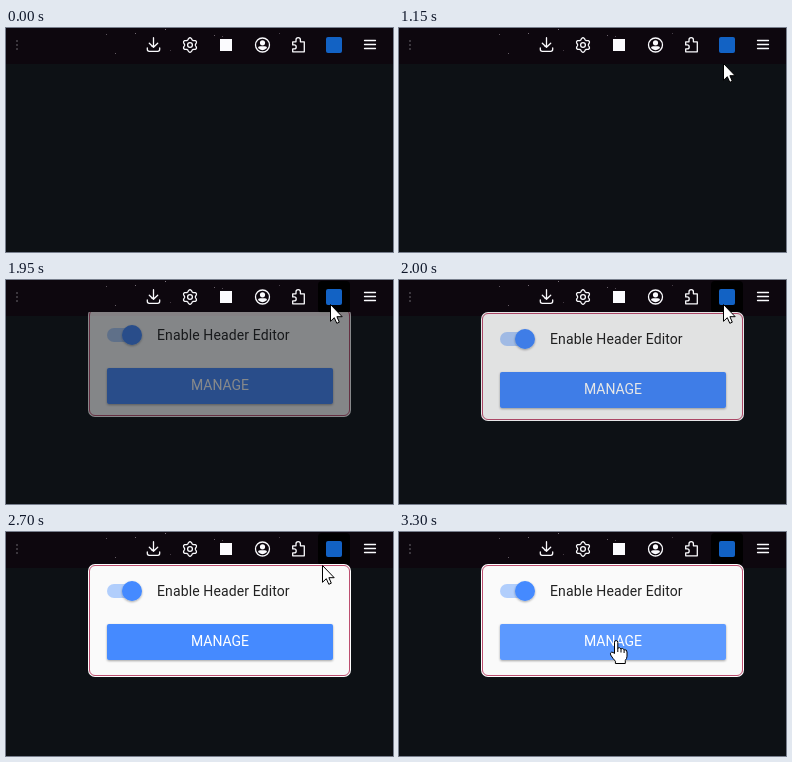
Animation of 387 by 224 pixels, one loop 4.35 s. Source, as an HTML page:

```html
<!DOCTYPE html>
<html lang="en">
<head>
<meta charset="utf-8">
<title>Toolbar popup</title>
<style>
  html, body { margin: 0; width: 100%; height: 100%; overflow: hidden; background: #0d1115; }
  svg { display: block; width: 387px; height: 224px; }
  text { font: 14px Roboto, sans-serif; }
  .line { fill: none; stroke: #fbfbfe; stroke-width: 1.3; stroke-linecap: round; stroke-linejoin: round; }
  .solid { fill: #fbfbfe; }
  .pointer { fill: #fff; stroke: #000; stroke-linejoin: round; }
</style>
</head>
<body>
<svg viewBox="0 0 387 224">
  <defs>
    <clipPath id="below"><rect y="32" width="387" height="192"/></clipPath>
    <filter id="shade" x="-20%" y="-20%" width="140%" height="160%">
      <feDropShadow dx="0" dy="1" stdDeviation="1" flood-opacity=".35"/>
    </filter>
  </defs>

  <rect width="387" height="224" fill="#0d1115"/>
  <rect width="387" height="36" fill="#0d070e"/>
  <g id="stars" fill="#b9aeb9"></g>
  <path d="M11 12V22" stroke="#48434a" stroke-width="1.6" stroke-dasharray="2"/>
  <rect id="pressed" x="312" y="1" width="32" height="32" rx="4"/>

  <g class="line">
    <path d="M147.5 9.7V19M143.3 15.2L147.5 19.3L151.7 15.2M141.3 20V21.3Q141.3 23.3 143.3 23.3H151.7Q153.7 23.3 153.7 21.3V20"/>
    <path id="gear"/>
    <circle cx="184" cy="17" r="2.4"/>
    <circle cx="256.5" cy="17" r="7"/>
    <path d="M286.7 13.8H290V11.8A2.2 2.2 0 0 1 294.4 11.8V13.8H298.3V23.8H286.7V20.9H288.2A2 2 0 0 0 288.2 16.9H286.7Z"/>
    <path d="M358.5 12.5H369.5M358.5 16.5H369.5M358.5 20.5H369.5"/>
  </g>
  <g class="solid">
    <rect x="214" y="11" width="12" height="12"/>
    <circle cx="256.5" cy="14.8" r="2.6"/>
    <path d="M252 20.1Q252 18.3 254 18.3H259Q261 18.3 261 20.1Q259 22.2 256.5 22.2T252 20.1Z"/>
  </g>
  <rect x="320" y="9" width="16" height="16" rx="2" fill="#1262c4"/>

  <g clip-path="url(#below)">
    <g id="popup">
      <rect class="panel" x="82" y="32" width="263" height="113" rx="7" fill="#fff"/>
      <rect class="panel" x="83.5" y="33.5" width="260" height="110" rx="5.5" fill="#fafafa" stroke="#bd4f70"/>
      <rect x="101" y="52" width="31" height="14" rx="7" fill="#b1cefc"/>
      <circle cx="126" cy="59" r="10" fill="#448aff" filter="url(#shade)"/>
      <text x="151" y="64" fill="#212121" letter-spacing=".12">Enable Header Editor</text>
      <rect id="button" x="101" y="92" width="226" height="36" rx="2" filter="url(#shade)"/>
      <text x="214" y="114" fill="#fff" text-anchor="middle">MANAGE</text>
    </g>
  </g>

  <g id="cursor" class="pointer">
    <path id="arrow" d="M.5 .5V17.3L4.3 13.7L6.8 19.3L9.3 18.2L6.9 12.7H12.2Z"/>
    <g id="hand">
      <path d="M-1.5 13.5V2.2A1.6 1.6 0 0 1 1.8 2.2V8.2Q3.4 6.8 5 8.8Q6.8 7.8 8.1 9.7Q11 9.2 11 12V16.2Q11 18.5 9.3 20.4V23.5H-.6V21.2Q-3 18.8 -5.3 15Q-6.3 12.7 -4.4 12.2Q-3 12 -1.5 13.5Z"/>
      <path fill="none" d="M1.8 8V12M5 9V12.5M8.1 10V13"/>
    </g>
  </g>
</svg>
<script>
const $ = id => document.getElementById(id);
const LOOP = 4350, STEP = 50;

const linear = k => k;
const power = p => k => k ** p;
const easeOut = p => k => 1 - (1 - k) ** p;
const smooth = k => k ** 3 * (k * (6 * k - 15) + 10);

// Eased 0..1 progress of t between two times
const progress = (t, start, end, ease = linear) =>
  ease(Math.min(1, Math.max(0, (t - start) / (end - start))));
const mix = (a, b, k) => a + (b - a) * k;

function cursorAt(t) {
  if (t < 2650) return [
    mix(377, 324, progress(t, 450, 1150, easeOut(1.3))),
    mix(207, 28, progress(t, 450, 1300, easeOut(1.85))) - 4 * progress(t, 1550, 1750)
  ];
  return [
    mix(324, 217, progress(t, 2650, 3200, power(1.08))),
    mix(24, 108, progress(t, 2650, 3200, power(.93)))
  ];
}

const show = (id, on) => $(id).setAttribute("visibility", on ? "visible" : "hidden");

function draw(t) {
  const [x, y] = cursorAt(t).map(Math.round);
  const overButton = t > 2650 && y >= 92;
  $("cursor").setAttribute("transform", `translate(${x} ${y})`);
  show("arrow", t >= 450 && !overButton);
  show("hand", overButton);
  show("pressed", t >= 1600);

  const open = progress(t, 1850, 2050, smooth);
  $("popup").setAttribute("opacity", open);
  $("popup").setAttribute("transform", `translate(0 ${Math.trunc(-8 * (1 - open))})`);
  const height = open < 1 ? 109 : 113;
  document.querySelectorAll(".panel").forEach((el, i) => el.setAttribute("height", height - i * 3));

  const lit = progress(t, 3050, 3300);
  $("button").setAttribute("fill", `rgb(${mix(68, 92, lit)}, ${mix(138, 153, lit)}, 255)`);
}

let seed = 11;
const random = () => (seed = seed * 16807 % 2147483647) / 2147483647;
$("stars").innerHTML = Array.from({ length: 9 }, () =>
  `<rect x="${Math.floor(100 + 210 * random())}" y="${Math.floor(35 * random() ** 2)}"
    width="1" height="1" opacity="${mix(.3, .8, random())}"/>`).join("");

const rim = Array.from({ length: 72 }, (_, i) => {
  const a = i * Math.PI / 36, r = 6.3 + .95 * Math.cos(6 * a);
  return `${(184 + r * Math.sin(a)).toFixed(2)} ${(17 - r * Math.cos(a)).toFixed(2)}`;
});
$("gear").setAttribute("d", `M${rim.join("L")}Z`);

const start = performance.now();
function tick() {
  const t = (performance.now() - start) % LOOP;
  draw(Math.floor(t / STEP) * STEP);
  requestAnimationFrame(tick);
}
tick();
</script>
</body>
</html>
```
